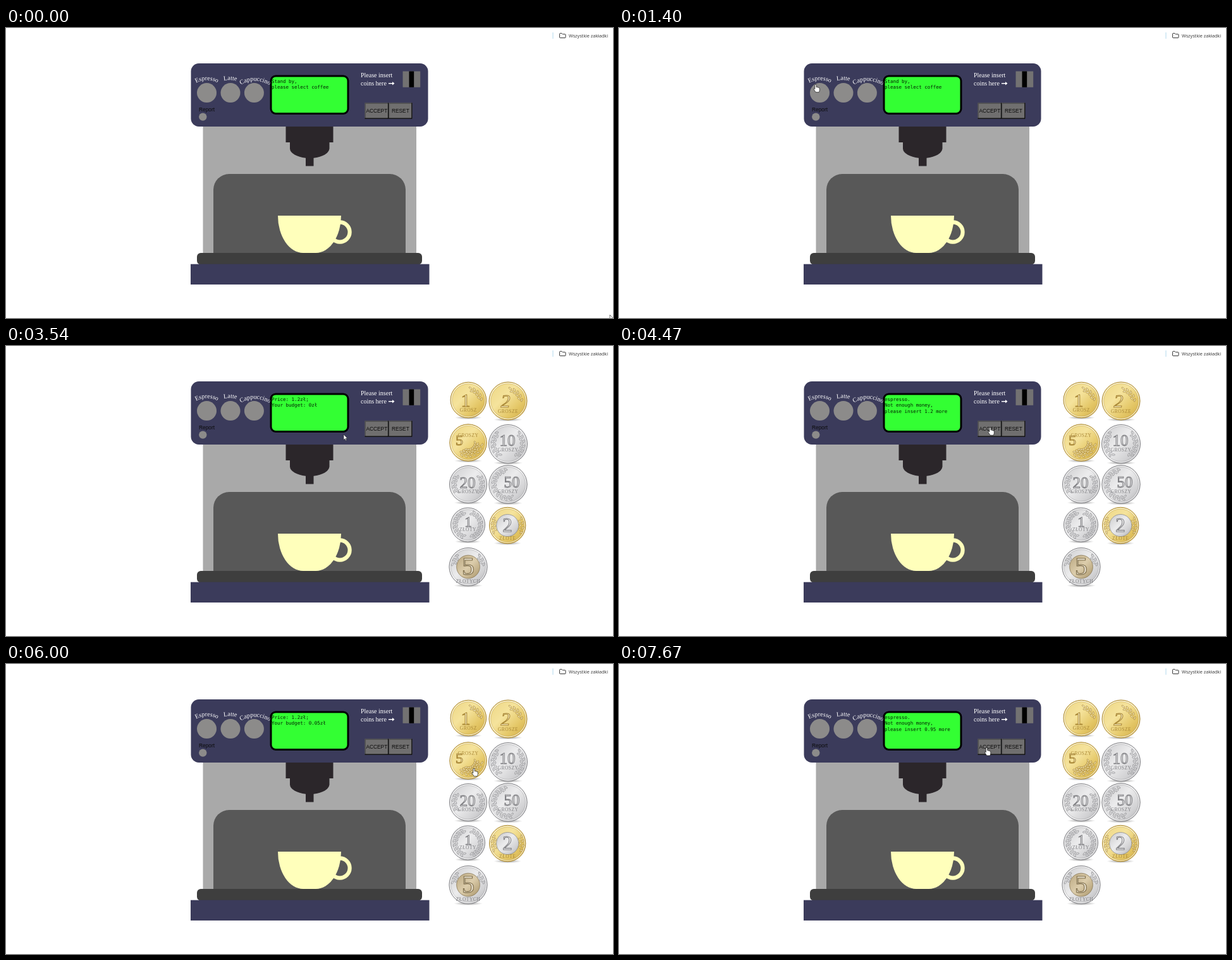
These frames come from a looping animation (960x459 px, 8 s). An HTML page:

```html
<!DOCTYPE html>
<html lang="pl">
<head>
<meta charset="utf-8">
<title>Coffee machine</title>
<style>
html, body { margin: 0; width: 100%; height: 100%; overflow: hidden; background: #fff; }
svg { display: block; width: 100%; height: 100%; }
text { white-space: pre; }
.serif { font: 10px "Liberation Serif", serif; fill: #fff; }
.sans { font: 8.333px "Liberation Sans", sans-serif; fill: #0c0c0c; }
.mono { font: 7.5px "DejaVu Sans Mono", monospace; fill: #032003; }
.mid { text-anchor: middle; }
.ui { font: 7.25px "Open Sans", "Noto Sans", sans-serif; fill: #333; }
.coin text { text-anchor: middle; font-family: "Liberation Serif", serif; }
</style>
</head>
<body>
<svg viewBox="0 0 960 459" preserveAspectRatio="none">
  <defs>
    <linearGradient id="gold" x1="0" y1="0" x2="1" y2="1">
      <stop offset="0" stop-color="#ecd583"/><stop offset=".4" stop-color="#f5e39c"/>
      <stop offset=".7" stop-color="#e4c767"/><stop offset="1" stop-color="#d0aa45"/>
    </linearGradient>
    <linearGradient id="silver" x1="0" y1="0" x2="1" y2="1">
      <stop offset="0" stop-color="#c9c9cb"/><stop offset=".45" stop-color="#ececed"/>
      <stop offset=".75" stop-color="#d2d2d4"/><stop offset="1" stop-color="#adadb0"/>
    </linearGradient>
    <linearGradient id="bronze" x1="0" y1="0" x2="1" y2="1">
      <stop offset="0" stop-color="#b9a67f"/><stop offset=".5" stop-color="#dccdac"/>
      <stop offset="1" stop-color="#a99468"/>
    </linearGradient>
    <radialGradient id="shade">
      <stop offset="0" stop-color="#555" stop-opacity=".6"/><stop offset="1" stop-color="#555" stop-opacity="0"/>
    </radialGradient>
    <path id="arcE" d="M300.5 87Q317.5 78 336 87"/>
    <path id="arcL" d="M344.5 83.3Q355 81 366.5 84"/>
    <path id="arcC" d="M371.5 90Q392 77 416 90"/>
  </defs>

  <path d="M865 7V17" stroke="#bfe0f0" stroke-width="1.2"/>
  <path d="M875.6 15V9.2Q875.6 8.4 876.4 8.4H879L880.3 9.8H884.2Q885 9.8 885 10.6V14.8Q885 15.6 884.2 15.6H876.4Q875.6 15.6 875.6 14.8Z" fill="none" stroke="#333"/>
  <text class="ui" x="890" y="14.6">Wszystkie zakładki</text>

  <rect x="311.5" y="150" width="337.5" height="207" fill="#a9a9a9"/>
  <path d="M328 357V256A25 25 0 0 1 353 231H607A25 25 0 0 1 632 256V357Z" fill="#585858"/>
  <rect x="302" y="356" width="356" height="18.5" rx="6" fill="#3e3e3e"/>
  <rect x="292" y="373.7" width="377.5" height="32.3" fill="#3b3b5b"/>
  <path d="M442.5 150H517.5V181H511.5V191A31 15.5 0 0 1 486.5 205.7V218.5H474V205.7A31 15.5 0 0 1 449 191V181H442.5Z" fill="#2b262a"/>
  <circle cx="528" cy="323" r="15.6" fill="none" stroke="#ffffbb" stroke-width="6.2"/>
  <path d="M430 297H530A40 59 0 0 1 490 356H470A40 59 0 0 1 430 297Z" fill="#ffffbb"/>

  <rect x="292.5" y="56" width="375" height="100" rx="12.5" fill="#3b3b5b"/>
  <g fill="#8c8b8a">
    <circle cx="317.5" cy="102.6" r="15.5"/><circle cx="355" cy="102.6" r="15.5"/>
    <circle cx="392.4" cy="102.6" r="15.5"/><circle cx="311.3" cy="140.6" r="6.2"/>
  </g>
  <g class="serif">
    <text><textPath href="#arcE">Espresso</textPath></text>
    <text><textPath href="#arcL">Latte</textPath></text>
    <text><textPath href="#arcC">Cappuccino</textPath></text>
    <text x="561" y="78">Please insert</text>
    <text x="561" y="91">coins here</text>
    <path d="M605 87H611V85L614.5 87.7L611 90.4V88.4H605Z"/>
  </g>
  <text class="sans" x="305" y="132">Report</text>
  <rect x="419" y="76" width="122" height="59.5" rx="7.5" fill="#33ff33" stroke="#000" stroke-width="3"/>
  <g class="mono" id="lines">
    <text x="420" y="86.8"/><text x="420" y="96.2"/><text x="420" y="105.8"/>
  </g>
  <rect x="627.5" y="68.5" width="27.7" height="25.3" fill="#737272"/>
  <rect x="637.5" y="68.5" width="7.7" height="25.3" fill="#000"/>
  <g id="buttons"></g>
  <g id="coins"></g>

  <path id="arrow" d="M0 0V8.6L2 6.8L3.3 9.7L4.6 9.1L3.3 6.2H6Z" fill="#fff" stroke="#222" stroke-width=".6"/>
  <path id="hand" d="M-1.2 7.5V1.2Q-1.2 .2 0 .2Q1.1 .2 1.1 1.2V4.5Q2.5 4 3 5Q4.4 4.5 4.8 5.6Q6.3 5.2 6.3 6.8V9.5Q6 11.5 5.2 12.7H0Q-.5 11.5 -3 8Q-3.3 6.5 -2.4 6.5Z" fill="#fff" stroke="#111" stroke-width=".7"/>
</svg>
<script>
const $ = id => document.getElementById(id);
const LOOP = 8000, STEP = 200 / 3;

function button(x, w, label) {
  const r = x + w, b = 143.7;
  return `<g><rect x="${x}" y="118.5" width="${w}" height="25.2" fill="#706f6f"/>
    <path class="tl" d="M${x + .6} ${b}V119.1H${r}" fill="none" stroke-width="1.2"/>
    <path class="br" d="M${x} ${b - .6}H${r - .6}V118.5" fill="none" stroke-width="1.2"/>
    <text class="sans mid" x="${x + w / 2}" y="134">${label}</text></g>`;
}
$('buttons').innerHTML = button(567.5, 37.7, 'ACCEPT') + button(605.2, 37.3, 'RESET');
const bevels = [...$('buttons').children].map(g => [g.querySelector('.tl'), g.querySelector('.br')]);

function setBevel(i, down) {
  bevels[i][0].setAttribute('stroke', down ? '#000' : '#484848');
  bevels[i][1].setAttribute('stroke', down ? '#484848' : '#000');
}

const edge = { gold: '#a98735', silver: '#808084', bronze: '#7d6c48' };

// Leaves along an arc, angles in degrees
function wreath(x, y, r, from, to, color) {
  let s = '';
  for (let a = from; a <= to; a += 9) {
    const q = a * Math.PI / 180, side = a / 9 & 1 ? 2 : -2;
    const px = x + (r + side) * Math.cos(q), py = y + (r + side) * Math.sin(q);
    s += `<ellipse cx="${px.toFixed(1)}" cy="${py.toFixed(1)}" rx="2.8" ry="1.2" transform="rotate(${a + 90 + side * 15} ${px.toFixed(1)} ${py.toFixed(1)})"/>`;
  }
  return `<g fill="#fff" fill-opacity=".4" stroke="${color}" stroke-width=".7">${s}</g>`;
}

function coin({ x, y, r, metal, core, num, at, size, label, ly, arcs = [], italic }) {
  const ink = edge[metal], face = core || metal;
  const inner = core ? `<circle cx="${x}" cy="${y}" r="${r * .6}" fill="url(#${core})" stroke="${edge[core]}" stroke-width=".7"/>` : '';
  return `<g class="coin">
    <ellipse cx="${x}" cy="${y + r - 1}" rx="${r * .75}" ry="3" fill="url(#shade)"/>
    <circle cx="${x}" cy="${y}" r="${r - .5}" fill="url(#${metal})" stroke="${ink}"/>
    <circle cx="${x}" cy="${y}" r="${r - 2.2}" fill="none" stroke="#fff" stroke-opacity=".65" stroke-width="1.2"/>
    <circle cx="${x}" cy="${y}" r="${r - 3.2}" fill="none" stroke="${ink}" stroke-opacity=".5" stroke-width=".6"/>
    ${inner}${arcs.map(([dx, dy, ar, a, b]) => wreath(x + dx, y + dy, ar, a, b, ink)).join('')}
    <text x="${at[0]}" y="${at[1]}" font-size="${size}" ${italic ? 'font-style="italic"' : ''} fill="#fff" fill-opacity=".5" stroke="${edge[face]}" stroke-width="1.1">${num}</text>
    <text x="${x}" y="${ly}" font-size="7.5" letter-spacing=".5" fill="${ink}">${label}</text></g>`;
}

const sides = r => [[0, 0, r, 126, 225], [0, 0, r, -45, 54]];
$('coins').innerHTML = [
  { x: 731.3, y: 85.5, r: 28.8, metal: 'gold', num: 1, at: [727, 96], size: 30, label: 'GROSZ', ly: 104, arcs: [[0, 2, 19, 279, 351]] },
  { x: 794, y: 87, r: 30.5, metal: 'gold', num: 2, at: [790, 97], size: 30, italic: true, label: 'GROSZE', ly: 106, arcs: [[0, 2, 20, 279, 351]] },
  { x: 731, y: 153, r: 29.7, metal: 'gold', num: 5, at: [717, 157], size: 24, label: 'GROSZY', ly: 143.5, arcs: [[0, 0, 20, 9, 126], [0, 0, 13, 0, 117]] },
  { x: 794, y: 155, r: 31, metal: 'silver', num: 10, at: [793, 158], size: 25, label: 'GROSZY', ly: 167, arcs: sides(23) },
  { x: 731, y: 219, r: 30, metal: 'silver', num: 20, at: [730, 225], size: 25, label: 'GROSZY', ly: 233, arcs: [[0, 0, 22, 144, 216], [0, 0, 22, -36, 36]] },
  { x: 794, y: 219, r: 30.7, metal: 'silver', num: 50, at: [800, 224], size: 25, label: 'GROSZY', ly: 233, arcs: [[0, 0, 22, 72, 261]] },
  { x: 730.5, y: 283, r: 27.5, metal: 'silver', num: 1, at: [731, 286], size: 23, label: 'ZŁOTY', ly: 293, arcs: [[0, 0, 20, 108, 252], [0, 0, 20, -72, 72]] },
  { x: 793.2, y: 284, r: 29.2, metal: 'gold', core: 'silver', num: 2, at: [793, 294], size: 31, label: 'ZŁOTE', ly: 307, arcs: [[0, 0, 22.5, 153, 207], [0, 0, 22.5, -27, 27]] },
  { x: 731, y: 349.5, r: 30.6, metal: 'silver', core: 'bronze', num: 5, at: [731, 362], size: 40, label: 'ZŁOTYCH', ly: 375, arcs: [[0, 0, 23, 189, 225], [0, 0, 23, -45, -9]] }
].map(coin).join('');

// Pointer route: [step, x, y]
const route = [
  [0, 955, 454], [4, 800, 381], [6, 620, 290], [8, 480, 215], [9, 432, 185], [10, 392, 160],
  [12, 322, 113], [17, 322, 113], [21, 311, 89], [41, 311, 89], [43, 313.5, 88.5], [45, 313.5, 88.5],
  [47, 316, 88], [49, 316, 88], [51, 410, 114], [53, 534, 140], [55, 614, 141], [57, 580, 122.3],
  [58, 580, 122.3], [60, 587, 128.5], [76, 587, 128.5], [79, 670, 144], [82, 751, 157], [85, 743, 157],
  [87, 743, 157], [90, 740, 165], [93, 735, 231], [101, 735, 231], [105, 650, 178], [108, 562, 134],
  [111, 581.5, 132.3], [120, 581.5, 132.3]
];

function pointer(k) {
  const i = route.findIndex(p => p[0] > k);
  const [k0, x0, y0] = route[i - 1], [k1, x1, y1] = route[i];
  const u = (k - k0) / (k1 - k0);
  return [x0 + (x1 - x0) * u, y0 + (y1 - y0) * u];
}

const budget = sum => ['Price: 1.2zł;', `Your budget: ${sum}zł`, ''];
const missing = sum => ['espresso.', 'Not enough money,', `please insert ${sum} more`];
const messages = [
  [0, ['Stand by,', 'please select coffee', '']],
  [29, budget('0')], [65, missing('1.2')], [88, budget('0.05')], [98, budget('0.25')], [115, missing('0.95')]
];

function clickable(x, y) {
  const brew = [317.5, 355, 392.4].some(cx => Math.hypot(x - cx, y - 102.6) < 15.5);
  const key = x > 567 && x < 643 && y > 118 && y < 144;
  const money = x > 701 && x < 825 && y > 56 && y < 380;
  return brew || key || money;
}

function draw(ms) {
  const k = Math.floor((ms % LOOP) / STEP + .01) % 120;
  const [x, y] = pointer(k);
  const coinsOut = k >= 29;
  const isHand = clickable(x, y) && (coinsOut || x < 701);
  const text = messages.filter(m => m[0] <= k).pop()[1];
  [...$('lines').children].forEach((el, i) => { el.textContent = text[i]; });
  $('coins').style.display = coinsOut ? '' : 'none';
  setBevel(0, (k >= 63 && k < 65) || (k >= 113 && k < 115));
  setBevel(1, false);
  for (const id of ['arrow', 'hand']) {
    $(id).setAttribute('transform', `translate(${x} ${y})`);
    $(id).style.display = (id === 'hand') === isHand ? '' : 'none';
  }
}

const start = performance.now();
function tick() {
  draw(performance.now() - start);
  requestAnimationFrame(tick);
}
tick();
</script>
</body>
</html>
```
